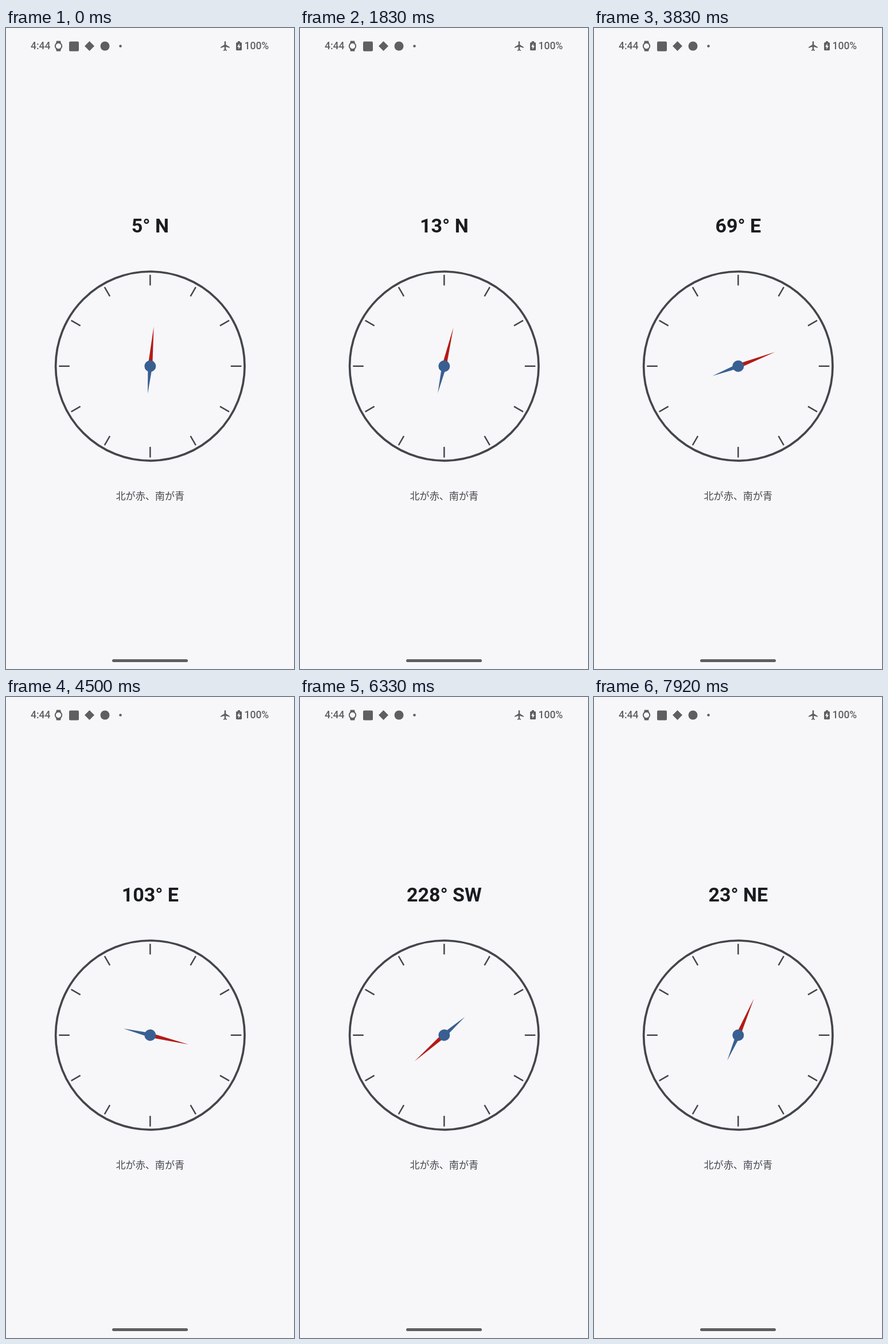
Recreate the animation shown at these times as an HTML page. Size 502 px wide and 1116 px high, loop 8 s.

```html
<!DOCTYPE html>
<html lang="ja">
<head>
<meta charset="utf-8">
<title>Compass</title>
<style>
  html, body { margin: 0; width: 100%; height: 100%; overflow: hidden; background: #f7f7f9; }
  svg { display: block; width: 100%; height: 100%; }
  .status { fill: #5f5f61; font: 500 17.5px Roboto, sans-serif; }
  .heading { fill: #191c20; font: 700 34px Roboto, sans-serif; text-anchor: middle; }
  .caption { fill: #43474e; font: 400 17.1px "Noto Sans CJK JP", "Noto Sans CJK", sans-serif; text-anchor: middle; }
  .dial { fill: none; stroke: #43464c; }
</style>
</head>
<body>
<svg viewBox="0 0 502 1116">
  <g class="status">
    <text x="43" y="37">4:44</text>
    <path d="M88 22.500h7l1.200 5h-9.400zM88 40.500h7l1.200-5h-9.400z"/>
    <circle cx="91.500" cy="31.500" r="5.700" fill="#f7f7f9" stroke="#5f5f61" stroke-width="2"/>
    <rect x="110" y="23.500" width="17" height="17" rx="2"/>
    <rect x="139.500" y="25.500" width="12" height="12" transform="rotate(45 145.500 31.500)"/>
    <circle cx="172.500" cy="31.500" r="8"/>
    <circle cx="199.500" cy="31.500" r="2.300"/>
    <path transform="translate(372.300 21.400) scale(.84)"
      d="M21 16v-2l-8-5V3.500a1.500 1.500 0 0 0-3 0V9l-8 5v2l8-2.500V19l-2 1.500V22l3.500-1 3.500 1v-1.500L13 19v-5.500l8 2.500z"/>
    <path d="M404 23h4v2h1.500q1.500 0 1.500 1.500v11q0 1.500-1.500 1.500h-7q-1.500 0-1.500-1.500v-11q0-1.500 1.500-1.500h1.500z"/>
    <path d="M406.700 27l-3.700 5.700h2.300v4.300l3.700-5.800h-2.300z" fill="#f7f7f9"/>
    <text x="415.500" y="37">100%</text>
    <rect x="185" y="1099" width="132" height="5" rx="2.500"/>
  </g>
  <g transform="translate(251.300 588.700)">
    <text class="heading" id="heading" y="-232.700"></text>
    <circle class="dial" r="164.700" stroke-width="3.700"/>
    <path class="dial" id="ticks" stroke-width="2.500"/>
    <g id="needle">
      <path d="M-3.900 0L0-69 3.900 0z" fill="#b31b17"/>
      <path d="M-3.900 0L0 48 3.900 0z" fill="#395f92"/>
    </g>
    <circle r="10" fill="#395f92"/>
    <text class="caption" y="232">北が赤、南が青</text>
  </g>
</svg>
<script>
  const LOOP = 8000, STEP = 1000 / 12;
  const POINTS = ['N', 'NE', 'E', 'SE', 'S', 'SW', 'W', 'NW'];
  // Time in seconds, needle angle in degrees
  const KEYS = [[0, 5.2], [1.83, 13.4], [3.08, 37.3], [4.5, 103.7], [5.5, 161.9], [6.33, 228.3], [7.92, 383.7]];
  // Turning speed at each key, degrees per second
  const SPEEDS = [1, 12, 33, 53, 69, 86, 106];

  const byId = id => document.getElementById(id);
  const heading = byId('heading'), needle = byId('needle');

  let ticks = '';
  for (let i = 0; i < 12; i++) {
    const x = Math.sin(i * Math.PI / 6), y = -Math.cos(i * Math.PI / 6);
    ticks += `M${x * 140.5} ${y * 140.5}L${x * 159} ${y * 159}`;
  }
  byId('ticks').setAttribute('d', ticks);

  function angleAt(s) {
    let i = 0;
    while (i < KEYS.length - 2 && s >= KEYS[i + 1][0]) i++;
    const [t0, a0] = KEYS[i], [t1, a1] = KEYS[i + 1];
    const h = t1 - t0, u = (s - t0) / h, v = 1 - u;
    return a0 * v * v * (1 + 2 * u) + a1 * u * u * (3 - 2 * u)
      + h * u * v * (SPEEDS[i] * v - SPEEDS[i + 1] * u);
  }

  const start = performance.now();
  function draw() {
    const t = (performance.now() - start) % LOOP;
    const step = Math.min(95, Math.floor((t + 4) / STEP));
    const angle = angleAt(step * STEP / 1000) % 360;
    needle.setAttribute('transform', `rotate(${angle})`);
    heading.textContent = `${Math.floor(angle)}° ${POINTS[Math.floor((angle + 22.5) / 45) % 8]}`;
    requestAnimationFrame(draw);
  }
  draw();
</script>
</body>
</html>
```
